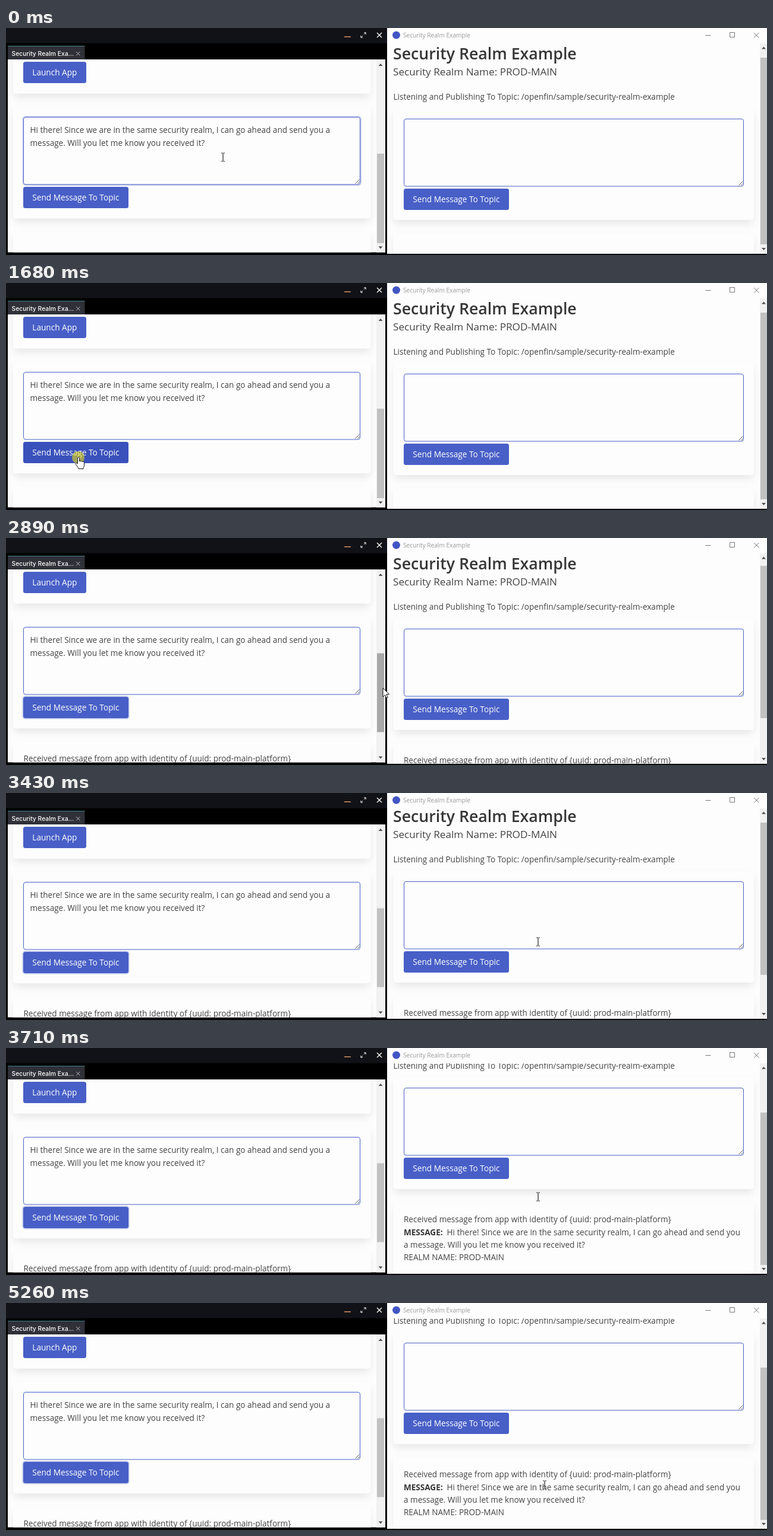
Write an HTML page that moves like this. It is 1280 by 383 pixels and loops after 5.33 s.

```html
<!DOCTYPE html>
<html lang="en">
<head>
<meta charset="utf-8">
<title>Security Realm Example</title>
<style>
  html, body { margin: 0; width: 100%; height: 100%; overflow: hidden; background: #000; }
  svg { display: block; }
  #stage { position: absolute; left: 0; top: 0; }
  text { font: 13.55px "Open Sans", "Noto Sans", sans-serif; fill: #444; white-space: pre; }
  .title { font-size: 26.7px; font-weight: 600; fill: #363636; }
  .sub { font-size: 17.15px; }
  .strong { font-weight: 700; fill: #363636; }
  .label { font-size: 13.65px; fill: #fff; }
  .caption { font-size: 10.14px; fill: #999; }
  .tab { font: 500 10.35px Inter, sans-serif; fill: #fff; }
  .page { fill: #fdfdfd; }
  .shade { fill: rgba(10, 10, 10, .1); filter: blur(7px); }
  .field { fill: #fdfdfd; stroke: #485fc7; }
  .btn { fill: #485fc7; }
  .ring { fill: none; stroke: #485fc7; stroke-opacity: .28; stroke-width: 2; }
  .track { fill: #f1f1f1; }
  .thumb { fill: #c1c1c1; }
  .arrow { fill: #505050; }
  .line { fill: none; stroke: #777; }
</style>
</head>
<body>
<svg id="stage" width="1280" height="383" viewBox="0 0 1280 383"></svg>
<script>
const LOOP = 5330;
const HELLO = 'Hi there! Since we are in the same security realm, I can go ahead and send you';
const RECEIVED = 'Received message from app with identity of {uuid: prod-main-platform}';

const text = (x, y, s, cls = '') => `<text x="${x}" y="${y}" class="${cls}">${s}</text>`;
const rect = (x, y, w, h, cls, r = 0, id = '') =>
  `<rect x="${x}" y="${y}" width="${w}" height="${h}" rx="${r}" class="${cls}" id="${id}"/>`;
const path = (d, attrs) => `<path d="${d}" ${attrs}/>`;

const card = (x, y, w, h) =>
  rect(x + 2, y + 9, w - 4, h - 4, 'shade', 4) + rect(x, y, w, h, 'page', 5);
const button = (x, y, w, label, id) =>
  rect(x, y, w, 36, 'btn', 3.5, id) + text(x + 15.3, y + 23.3, label, 'label');
const field = (x, y, w) =>
  rect(x, y, w, 113.5, 'field', 3.5) +
  path(`M${x + w - 8} ${y + 112}l7-7m-3 7l3-3`, 'class="line" style="stroke:#555"');
const arrows = (x, top, bottom) =>
  path(`M${x - 3.5} ${top + 2}h7l-3.5-4zM${x - 3.5} ${bottom - 2}h7l-3.5 4z`, 'class="arrow"');
const view = (x, y, w, h, body) =>
  `<svg x="${x}" y="${y}" width="${w}" height="${h}" viewBox="${x} ${y} ${w} ${h}">${body}</svg>`;

const leftWindow =
  rect(0, 0, 641, 25.5, '', 0, 'bar') +
  rect(3, 30, 129.5, 23, '', 0, 'tab') +
  path('M3 30.5H132.5', 'stroke="#3f7f88"') +
  text(9.5, 46.5, 'Security Realm Exa...', 'tab') +
  path('M118 40l6.5 6.5m0-6.5l-6.5 6.5', 'class="line" style="stroke:#bbb"') +
  path('M569 14.8h11', 'stroke="#e59c6c" stroke-width="1.4"') +
  path('M602 10.8l3-3m-3 0h3.2v3.2M600 13l-3 3m3 0h-3.2v-3.2', 'class="line" style="stroke:#eee"') +
  path('M624 8l8 8m0-8l-8 8', 'class="line" style="stroke:#fff;stroke-width:1.4"') +
  view(3, 53, 635, 325.5,
    rect(3, 53, 635, 326, 'page') +
    card(11.7, 0, 602, 110.7) +
    button(29, 57, 106, 'Launch App') +
    card(11.7, 132.5, 602, 188.7) +
    rect(28.5, 149.5, 568.5, 115.5, 'ring', 4.5, 'glow') +
    field(29.5, 150.5, 566) +
    text(40.5, 177, HELLO + ' a') +
    text(40.5, 198.5, 'message. Will you let me know you received it?') +
    rect(336, 183, 1, 19, '', 0, 'caret') +
    button(29, 268, 177, 'Send Message To Topic', 'send') +
    rect(28.2, 267.2, 178.6, 37.6, 'ring', 4.2, 'focus') +
    card(11.7, 343, 602, 130) +
    `<g class="reply">${text(29.5, 376.5, RECEIVED)}</g>` +
    rect(623, 53, 15, 326, 'track') +
    rect(624, 212, 12, 151, 'thumb', 0, 'thumbL') +
    arrows(630, 62, 370.5));

const rightWindow =
  rect(641, 0, 639, 381, 'page') +
  '<circle cx="656.5" cy="12" r="6.5" fill="#4255c4"/>' +
  text(668, 16, 'Security Realm Example', 'caption') +
  path('M1176.5 12.5h9M1217.5 7.5h8v8h-8zM1258 8l8.5 8.5m0-8.5l-8.5 8.5', 'class="line"') +
  view(641, 26, 639, 355,
    '<g id="scroll">' +
    text(651, 52.5, 'Security Realm Example', 'title') +
    text(651, 79.8, 'Security Realm Name: PROD-MAIN', 'sub') +
    text(651.5, 120.5, 'Listening and Publishing To Topic: /openfin/sample/security-realm-example') +
    card(651.3, 135, 607, 189) +
    field(669.5, 153.5, 571) +
    button(669, 271, 177, 'Send Message To Topic') +
    card(651.3, 346, 607, 121) +
    '<g class="reply">' +
    text(669, 380, RECEIVED) +
    text(669, 401.5, 'MESSAGE:', 'strong') +
    text(741.5, 401.5, HELLO) +
    text(669, 422.9, 'a message. Will you let me know you received it?') +
    text(669, 444.2, 'REALM NAME: PROD-MAIN') +
    '</g></g>' +
    rect(1268, 26, 12, 355, 'track') +
    rect(1269, 50, 11, 315, 'thumb', 0, 'thumbR') +
    arrows(1274.5, 33.5, 373));

const pointer =
  '<circle id="click" cx="121.5" cy="294.5" r="10.5" fill="#e6dc14" fill-opacity=".6"/>' +
  '<g id="pointer">' +
  path('M-3-7h2.5M.5-7H3M0-6.5v13M-3 7h2.5M.5 7H3', 'id="beam" fill="none" stroke="#222" stroke-width="1.2"') +
  path('M0 0V15l3.5-3.3 2.3 5.3 2.4-1-2.3-5.2h4.7z', 'id="arrow" fill="#fff" stroke="#111"') +
  path('M-1.5 1.3C-1.5-.6 1.5-.6 1.5 1.3V7c0-1.2 2.6-1.2 2.8.3 .2-1 2.6-.9 2.7.5 .3-.9 2.5-.7 2.5.9V14' +
    'c0 2-1.5 3-1.5 5.5H0C0 17-4.5 13-4.8 11.2-5 9.4-3 8.9-1.5 11z', 'id="hand" fill="#fff" stroke="#111"') +
  '</g>';

const stage = document.getElementById('stage');
stage.innerHTML = leftWindow + rightWindow + pointer;
const $ = id => document.getElementById(id);
$('bar').style.fill = '#111217';
$('tab').style.fill = '#2f3038';

// rows: [time, value], each value held until the next row
function hold(el, rows, frame) {
  el.animate(
    rows.map(([t, ...v]) => ({ offset: t / LOOP, easing: 'step-end', ...frame(...v) })),
    { duration: LOOP, iterations: Infinity });
}
const show = (el, rows) => hold(el, rows, opacity => ({ opacity }));

const moves = [
  [0, 365, 218, 'beam'],
  [790, 362, 219, 'beam'], [860, 338, 229, 'beam'], [930, 291, 247, 'beam'],
  [1000, 222, 272, 'arrow'], [1070, 162, 291, 'hand'], [1140, 132, 298, 'hand'],
  [1210, 123, 300, 'hand'], [1410, 122, 296, 'hand'], [1480, 122, 294, 'hand'],
  [2360, 231, 274, 'arrow'], [2430, 625, 254, 'arrow'],
  [2890, 634, 253, 'arrow'], [2960, 840, 240, 'beam'], [3030, 895, 251, 'beam'],
  [5050, 899, 260, 'arrow'], [5120, 911, 276, 'arrow'],
  [5190, 908, 302, 'beam'], [5260, 906, 307, 'beam']
];
hold($('pointer'), moves, (x, y) => ({ transform: `translate(${x}px, ${y}px)` }));
for (const kind of ['beam', 'arrow', 'hand'])
  show($(kind), moves.map(([t, , , k]) => [t, +(k === kind)]));

show($('click'), [[0, 0], [1480, 1], [1760, 0]]);
show($('caret'), [[0, 0], [330, 1], [860, 0], [1410, 1], [1680, 0]]);
show($('glow'), [[0, 1], [1680, 0]]);
show($('focus'), [[0, 0], [1760, 1]]);
document.querySelectorAll('.reply').forEach(el => show(el, [[0, 0], [1760, 1]]));

const fill = c => ({ fill: c });
hold($('send'), [[0, '#485fc7'], [1070, '#3a51bb'], [2360, '#485fc7']], fill);
hold($('thumbL'), [[0, '#c1c1c1'], [2430, '#a8a8a8'], [2960, '#c1c1c1']], fill);

const bar = (y, h) => ({ y: y + 'px', height: h + 'px' });
hold($('thumbL'), [[0, 212, 151], [1760, 194.5, 133]], bar);

const scrolls = [[1760, 0], [3360, 1], [3430, 4], [3500, 25], [3570, 54], [3640, 77], [3710, 86]];
hold($('scroll'), [[0, 0], ...scrolls], d => ({ transform: `translateY(${-d}px)` }));
hold($('thumbR'), [[0, 50, 315], ...scrolls.map(([t, d]) => [t, 47 + d * .72, 257])], bar);
</script>
</body>
</html>
```
